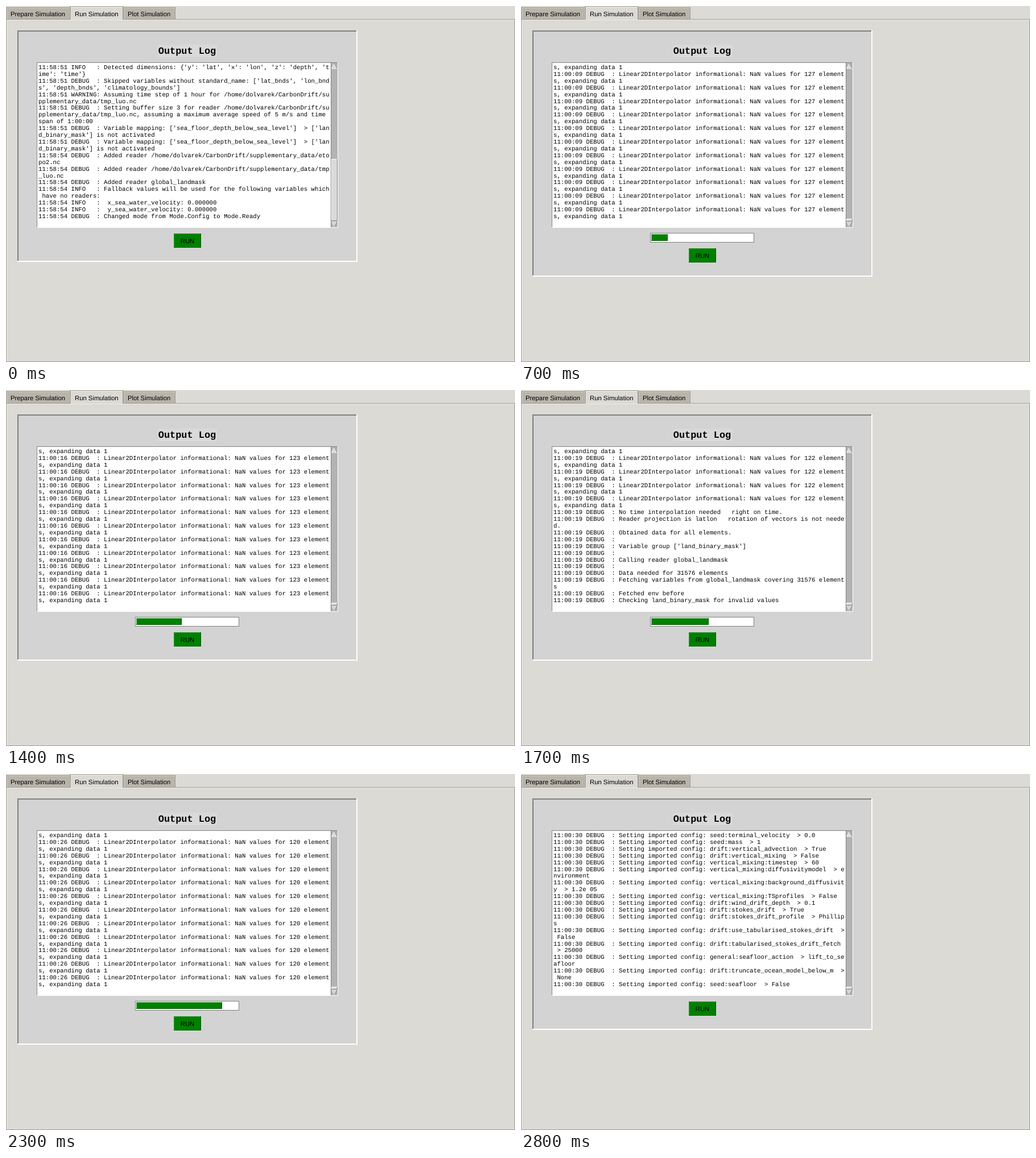
Recreate the animation shown at these times as an HTML page with a canvas. Size 895 by 626 pixels, loop 2.9 s.

```html
<!DOCTYPE html>
<html lang="en">
<head>
<meta charset="utf-8">
<title>Run Simulation</title>
<style>
html, body { margin: 0; width: 100%; height: 100%; overflow: hidden; background: #dcdad5; }
canvas { display: block; }
</style>
</head>
<body>
<canvas id="stage" width="895" height="626"></canvas>
<script>
const ctx = document.getElementById('stage').getContext('2d');
const STEP = 100, STEPS = 29, COLUMNS = 80, ROWS = 23, LINE = 11.91;
const SANS = '11.3px "Liberation Sans", Arial, sans-serif';
const MONO = '10.667px "Liberation Mono", monospace';
const TITLE = 'bold 16.9px "Liberation Mono", monospace';

const DATA = '/home/dolvarek/CarbonDrift/supplementary_data/';
const ROTATION = 'Reader projection is latlon   rotation of vectors is not needed.';
const MAPPING = "Variable mapping: ['sea_floor_depth_below_sea_level']  > ['land_binary_mask'] is not activated";

const entry = (time, text, level = 'DEBUG') => `${time} ${level.padEnd(7)}: ${text}`;

const startLog = [
  ['51', "Detected dimensions: {'y': 'lat', 'x': 'lon', 'z': 'depth', 'time': 'time'}", 'INFO'],
  ['51', "Skipped variables without standard_name: ['lat_bnds', 'lon_bnds', 'depth_bnds', 'climatology_bounds']"],
  ['51', `Assuming time step of 1 hour for ${DATA}tmp_luo.nc`, 'WARNING'],
  ['51', `Setting buffer size 3 for reader ${DATA}tmp_luo.nc, assuming a maximum average speed of 5 m/s and time span of 1:00:00`],
  ['51', MAPPING],
  ['51', MAPPING],
  ['54', `Added reader ${DATA}etopo2.nc`],
  ['54', `Added reader ${DATA}tmp_luo.nc`],
  ['54', 'Added reader global_landmask'],
  ['54', 'Fallback values will be used for the following variables which have no readers:', 'INFO'],
  ['54', ' x_sea_water_velocity: 0.000000', 'INFO'],
  ['54', ' y_sea_water_velocity: 0.000000', 'INFO'],
  ['54', 'Changed mode from Mode.Config to Mode.Ready']
].map(([second, text, level]) => entry('11:58:' + second, text, level));

const config = [
  'seed:terminal_velocity  > 0.0',
  'seed:mass  > 1',
  'drift:vertical_advection  > True',
  'drift:vertical_mixing  > False',
  'vertical_mixing:timestep  > 60',
  'vertical_mixing:diffusivitymodel  > environment',
  'vertical_mixing:background_diffusivity  > 1.2e 05',
  'vertical_mixing:TSprofiles  > False',
  'drift:wind_drift_depth  > 0.1',
  'drift:stokes_drift  > True',
  'drift:stokes_drift_profile  > Phillips',
  'drift:use_tabularised_stokes_drift  > False',
  'drift:tabularised_stokes_drift_fetch  > 25000',
  'general:seafloor_action  > lift_to_seafloor',
  'drift:truncate_ocean_model_below_m  > None',
  'seed:seafloor  > False'
].map(text => 'Setting imported config: ' + text);

const landmask = count => [
  '',
  "Variable group ['land_binary_mask']",
  '',
  'Calling reader global_landmask',
  '',
  `Data needed for ${count} elements`,
  `Fetching variables from global_landmask covering ${count} elements`,
  'Fetched env before',
  'Checking land_binary_mask for invalid values'
];

const onTime = ['No time interpolation needed   right on time.', ROTATION];

const summary = [
  ' (z:  1772.000000 to  1320.994629)',
  'Horizontal diffusivity is 0, no random walk.',
  '30749 active elements (5848 deactivated)',
  'Cleaning up',
  ...landmask(30749),
  ROTATION,
  'Obtained data for all elements.',
  '',
  'Finished processing all variable groups',
  ' '.repeat(13) + 'SUMMARY',
  '    land_binary_mask: 0 (min) 0 (max)',
  '',
  'No elements hit coastline.'
];

function interpolate(points, x) {
  if (x <= points[0][0]) return points[0][1];
  for (let i = 1; i < points.length; i++) {
    const [x0, y0] = points[i - 1], [x1, y1] = points[i];
    if (x <= x1) return y0 + (y1 - y0) * (x - x0) / (x1 - x0);
  }
  return points[points.length - 1][1];
}

const progress = step => Math.round(interpolate(
  [[3, 0], [7, 29], [12, 66], [17, 101], [20, 125], [26, 176], [27, 179]], step));
const missing = step => Math.round(interpolate(
  [[1, 132], [7, 127], [11, 123], [12, 123], [17, 122], [20, 121], [25, 120]], step));

function messages(step) {
  if (step >= 27) return config;
  if (step === 26) return summary;
  const nan = `Linear2DInterpolator informational: NaN values for ${missing(step)} elements, expanding data 1`;
  const repeated = Array(12).fill(nan);
  if (step === 17) return [...repeated, ...onTime, 'Obtained data for all elements.', ...landmask(31576)];
  if (step === 20) return [...repeated, ...onTime];
  return repeated;
}

function logRows(step) {
  const second = Math.min(30, step + 2 + (step > 22 ? 1 : 0));
  const time = '11:00:' + String(second).padStart(2, '0');
  const log = step === 0 ? startLog : messages(step).map(text => entry(time, text));
  const rows = [];
  for (const text of log) {
    for (let i = 0; i < text.length; i += COLUMNS) rows.push(text.slice(i, i + COLUMNS));
  }
  return rows.slice(-ROWS);
}

function rect(x, y, w, h, color) {
  ctx.fillStyle = color;
  ctx.fillRect(x, y, w, h);
}

function bevel(x, y, w, h, fill, topLeft, bottomRight, size = 1) {
  rect(x, y, w, h, bottomRight);
  rect(x, y, w - size, h - size, topLeft);
  rect(x + size, y + size, w - 2 * size, h - 2 * size, fill);
}

function label(text, x, y, font, align = 'left') {
  ctx.font = font;
  ctx.textAlign = align;
  ctx.fillStyle = '#000';
  ctx.fillText(text, x, y);
}

function tab(x, w, text, active) {
  const y = active ? 0 : 2, h = active ? 24 : 21;
  rect(x, y, w, h, '#9e9a91');
  rect(x + 1, y + 1, w - 2, h - 1, active ? '#eeebe7' : '#cfcac2');
  rect(x + 2, y + 2, w - 3, h - 2, active ? '#dcdad5' : '#bab5ab');
  label(text, x + 8, 17.5, SANS);
}

function notebook() {
  rect(0, 0, 895, 626, '#dcdad5');
  bevel(0, 23, 895, 603, '#dcdad5', '#9e9a91', '#9e9a91');
  rect(1, 24, 893, 1, '#eeebe7');
  rect(1, 24, 1, 601, '#eeebe7');
  tab(0, 114, 'Prepare Simulation', false);
  tab(206, 92, 'Plot Simulation', false);
  tab(113, 93, 'Run Simulation', true);
}

function arrow(y, up) {
  const tip = up ? y + 1 : y + 10, base = up ? y + 10 : y + 1;
  ctx.beginPath();
  ctx.moveTo(577.5, tip);
  ctx.lineTo(582.5, base);
  ctx.lineTo(572.5, base);
  ctx.closePath();
  ctx.fillStyle = '#d9d9d9';
  ctx.fill();
  ctx.lineWidth = 1;
  ctx.strokeStyle = up ? '#f4f4f4' : '#828282';
  ctx.stroke();
  ctx.beginPath();
  ctx.moveTo(577.5, tip);
  ctx.lineTo(up ? 582.5 : 572.5, base);
  if (!up) ctx.lineTo(582.5, base);
  ctx.strokeStyle = up ? '#828282' : '#f4f4f4';
  ctx.stroke();
}

function scrollbar(thumbTop, thumbBottom) {
  bevel(571, 99, 13, 291, '#b3b3b3', '#828282', '#fff');
  arrow(100, true);
  arrow(378, false);
  bevel(572, thumbTop, 11, thumbBottom - thumbTop, '#d9d9d9', '#fff', '#828282');
}

function draw(step) {
  const running = step > 0 && step < 28;
  const shift = running ? 26 : 0;
  notebook();
  bevel(20, 43, 598, 407 + shift, '#d3d3d3', '#7f7f7f', '#fff', 2);
  rect(267, 68, 104, 22, '#d9d9d9');
  label('Output Log', 318.5, 84, TITLE, 'center');

  bevel(54, 99, 518, 291, '#fff', '#828282', '#fff');
  logRows(step).forEach((row, i) => label(row, 57, 111 + i * LINE, MONO));
  if (step === 0) scrollbar(269, 378);
  else scrollbar(374, 379);

  if (running) {
    bevel(227, 399, 183, 17, '#fff', '#7f7f7f', '#7f7f7f');
    const width = progress(step);
    if (width > 2) bevel(229, 401, width, 12, '#008000', '#5fb05f', '#005000');
  }
  bevel(295, 400 + shift, 48, 25, '#008000', '#2b962b', '#005a00');
  label('RUN', 319, 416.5 + shift, SANS, 'center');
}

ctx.textRendering = 'geometricPrecision';
function frame(now) {
  draw(Math.floor(now / STEP) % STEPS);
  requestAnimationFrame(frame);
}
const start = performance.now();
draw(0);
requestAnimationFrame(function tick(now) {
  draw(Math.floor(Math.max(0, now - start) / STEP) % STEPS);
  requestAnimationFrame(tick);
});
</script>
</body>
</html>
```
